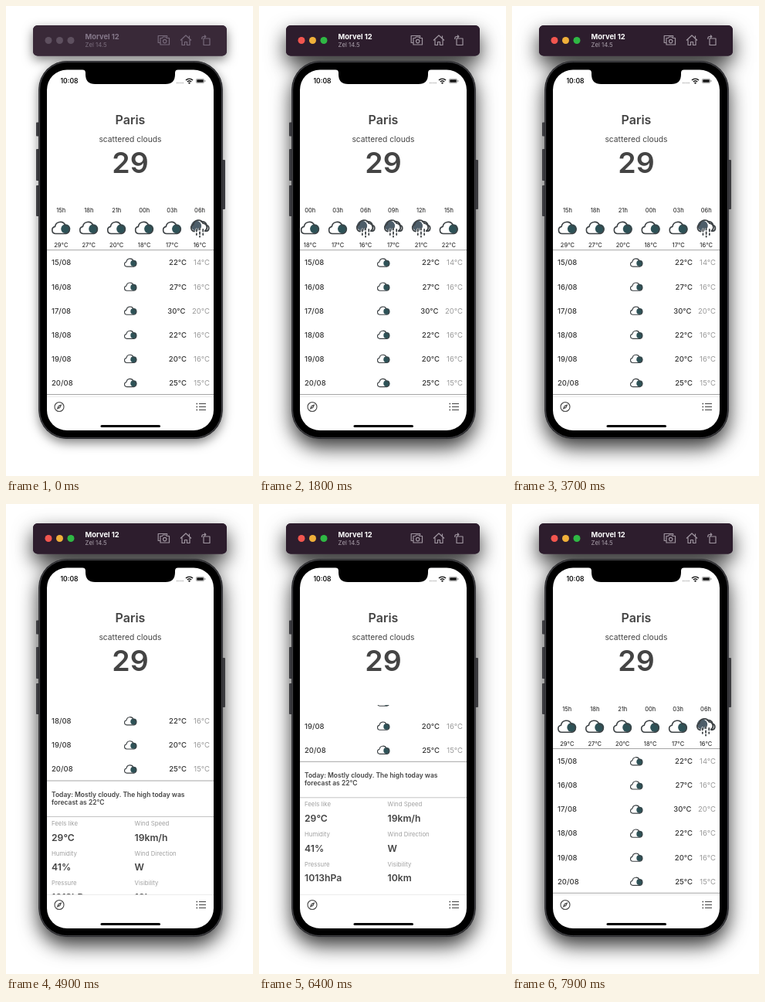
Write an HTML page that moves like this. It is 320 px wide and 608 px high and loops after 8 s.

```html
<!DOCTYPE html>
<html lang="en">
<head>
<meta charset="utf-8">
<title>Weather app</title>
<style>
  html, body { margin: 0; width: 100%; height: 100%; overflow: hidden; background: #fff; }
  svg { display: block; width: 320px; height: 608px; font-family: Inter, "Liberation Sans", sans-serif; }
</style>
</head>
<body>
<svg id="stage" viewBox="0 0 320 608" xmlns="http://www.w3.org/2000/svg">
  <defs>
    <filter id="idle" x="-20%" y="-20%" width="140%" height="140%">
      <feDropShadow dx="0" dy="5" stdDeviation="7" flood-opacity=".5"/>
    </filter>
    <filter id="focus" x="-20%" y="-20%" width="140%" height="140%">
      <feDropShadow dx="0" dy="11" stdDeviation="13" flood-opacity=".8"/>
    </filter>
    <clipPath id="view"><rect x="53" y="260" width="216" height="245.5"/></clipPath>
    <path id="puff" d="M-7 7.5a4.6 4.6 0 0 1-.8-9.1a7 7 0 0 1 13.4-1.6a5.4 5.4 0 0 1 1 10.7z"/>
    <g id="clouds">
      <use href="#puff" fill="#fff"/>
      <circle cx="6" cy="1.2" r="6" fill="#2e5257"/>
      <use href="#puff" fill="none" stroke="#3d4245" stroke-width="1.6"/>
    </g>
    <g id="rain" fill="none" stroke="#3d4245" stroke-width="1.8" stroke-linecap="round">
      <path d="M2-8a5.8 5.8 0 0 1 7 4.6a4 4 0 0 1 0 7.6h-2" fill="#fff"/>
      <circle cx="-4.5" cy="-2.6" r="6.6" fill="#4d5d69" stroke="none"/>
      <path d="M-7 4.5a4.6 4.6 0 0 1-1.4-8.8a6.6 6.6 0 0 1 12.6-1.600a5.300 5.300 0 0 1 2.800 9.600"/>
      <path d="M-4.200 2v7M0 1v10M4.200 2v7" stroke="#fff" stroke-width="3"/>
      <path d="M-4.200 2v2.500M-4.200 7.500v1.500M0 0v2.500M0 5.500v2.500M0 10.700v1M4.200 2v2.500M4.200 7.500v1.500"/>
    </g>
  </defs>

  <g id="shadow">
    <rect x="35" y="25" width="251" height="39.5" rx="6" fill="#2d1c2e"/>
    <rect x="42.5" y="71" width="238" height="489" rx="37" fill="#3b3b3e"/>
  </g>

  <rect id="bar" x="35" y="25" width="251" height="39.5" rx="6"/>
  <g id="lights">
    <circle cx="55" cy="44.5" r="4.5"/><circle cx="69.5" cy="44.5" r="4.5"/><circle cx="84" cy="44.5" r="4.5"/>
  </g>
  <text id="title" x="102.5" y="43.4" font-size="9.4" font-weight="700">Morvel 12</text>
  <text id="sub" x="102.5" y="53.2" font-size="7.8">Zel 14.5</text>
  <g id="tools" fill="none" stroke-width="1.2" stroke-linejoin="round">
    <path d="M199.5 47.5h-2.3v-9h11.5v2M200 41.5h2.500l1-1.5h3.5l1 1.5h3.5v8.500h-11.5z"/>
    <circle cx="205.7" cy="45.6" r="2.2"/>
    <path d="M226 44.5l7-6.5l7 6.5M228 43.5v7h3.5v-4h3v4h3.5v-7M237.5 41.5v-3"/>
    <path d="M256 42h8v8.500h-8zM253.800 43v-1a2.500 2.500 0 0 1 2.500-2.500h2M257 37.700l1.800 1.800l-1.800 1.800"/>
  </g>

  <g fill="#3c3c40">
    <rect x="39" y="150.5" width="5" height="18" rx="1"/>
    <rect x="39" y="185" width="5" height="41" rx="1"/>
    <rect x="39" y="232" width="5" height="40" rx="1"/>
    <rect x="279" y="199" width="5" height="64" rx="1"/>
  </g>
  <rect x="42.2" y="71" width="238.6" height="489" rx="37" fill="#29292c"/>
  <rect x="43.6" y="72.4" width="235.8" height="486.2" rx="35.6" stroke="#505054" stroke-width=".9"/>
  <rect x="53" y="82.5" width="216" height="466.5" rx="26" fill="#fff"/>
  <path d="M99 82h124q-4 .5-4 4.500v2q0 12.5-12.5 12.5h-91q-12.5 0-12.5-12.5v-2q0-4-4-4.500z"/>

  <text x="82" y="100.2" font-size="8.6" font-weight="600" text-anchor="middle" fill="#111">10:08</text>
  <path d="M221 99.5h9" stroke="#aaa" stroke-width="1.3" stroke-dasharray="1.3 1.2"/>
  <g fill="none" stroke="#111" stroke-width="1.4">
    <path d="M233 96a6.3 6.3 0 0 1 9 0M234.8 98a3.9 3.9 0 0 1 5.4 0"/>
    <circle cx="237.5" cy="99.6" r=".5"/>
    <rect x="246.3" y="94.3" width="10.4" height="5.4" rx="1.6" stroke="#888" stroke-width=".7"/>
  </g>
  <rect x="247.2" y="95.2" width="8.6" height="3.6" rx=".8" fill="#111"/>
  <path d="M257.8 96v2" stroke="#888"/>

  <g fill="#444" text-anchor="middle">
    <text x="161" y="153" font-size="16" font-weight="600">Paris</text>
    <text x="161" y="175.6" font-size="10.3">scattered clouds</text>
    <text x="161" y="216.2" font-size="37.5" font-weight="600">29</text>
  </g>

  <g clip-path="url(#view)"><g id="page"><g id="hours"></g></g></g>

  <path d="M53 505.5h216" stroke="#e4e4e4" stroke-width=".7"/>
  <g fill="none" stroke="#444" stroke-width="1.1">
    <circle cx="69" cy="518.5" r="6"/>
    <path d="M72 515.5l-1.8 4.2l-4.2 1.8l1.8-4.2z" fill="#444" stroke-width=".4"/>
    <circle cx="69" cy="518.5" r=".8" fill="#fff" stroke="none"/>
    <path d="M250 514.5h9M250 518.5h9M250 522.5h9"/>
    <path d="M246.5 514.5h1.6M246.5 518.5h1.6M246.5 522.5h1.6" stroke-width="1.5"/>
  </g>
  <rect x="122.5" y="542" width="77.5" height="3" rx="1.5"/>
</svg>
<script>
const $ = id => document.getElementById(id);
const NS = 'http://www.w3.org/2000/svg';

function add(parent, tag, attrs, text) {
  const el = document.createElementNS(NS, tag);
  for (const k in attrs) el.setAttribute(k, attrs[k]);
  if (text) el.textContent = text;
  parent.appendChild(el);
}
function label(parent, text, x, y, size, weight = 500, fill = '#333', anchor = 'start') {
  add(parent, 'text', { x, y, fill, 'font-size': size, 'font-weight': weight, 'text-anchor': anchor }, text);
}
function icon(parent, name, x, y, scale) {
  add(parent, 'use', { href: '#' + name, transform: `translate(${x} ${y}) scale(${scale})` });
}
function rule(y, stroke) {
  add($('page'), 'path', { d: `M53 ${y}h216`, stroke, 'stroke-width': 1 });
}

const hourTemps = [29, 27, 20, 18, 17, 16, 17, 21, 22];
const days = [[22, 14], [27, 16], [30, 20], [22, 16], [20, 16], [25, 15]];
const facts = [
  ['Feels like', '29°C', 'Wind Speed', '19km/h'],
  ['Humidity', '41%', 'Wind Direction', 'W'],
  ['Pressure', '1013hPa', 'Visibility', '10km']
];

function build() {
  const page = $('page'), hours = $('hours');
  hourTemps.forEach((temp, i) => {
    const x = 71.3 + i * 35.95;
    const hour = String((15 + i * 3) % 24).padStart(2, '0');
    label(hours, hour + 'h', x, 267.3, 7.4, 500, '#333', 'middle');
    icon(hours, i > 4 && i < 8 ? 'rain' : 'clouds', x, 287, 1);
    label(hours, temp + '°C', x, 312, 7.5, 500, '#333', 'middle');
  });
  rule(315.7, '#a6a6a6');
  days.forEach(([high, low], i) => {
    const y = 332 + i * 31.1;
    label(page, `${15 + i}/08`, 59, y + 3.4, 9.5);
    icon(page, 'clouds', 161.3, y, .68);
    label(page, high + '°C', low === 20 ? 232.5 : 234, y + 3.4, 9.5, 500, '#333', 'end');
    label(page, low + '°C', 264, y + 3.4, 9.5, 400, '#999', 'end');
  });
  rule(502.5, '#a6a6a6');
  label(page, 'Today: Mostly cloudy. The high today was', 59, 523.4, 8.5, 600, '#444');
  label(page, 'forecast as 22°C', 59, 533.6, 8.5, 600, '#444');
  rule(549, '#c4c4c4');
  facts.forEach((row, i) => {
    const y = 560.3 + i * 38.8;
    [59, 166.5].forEach((x, c) => {
      label(page, row[c * 2], x, y, 7.8, 400, '#a0a0a0');
      label(page, row[c * 2 + 1], x, y + 19.7, 12.2, 600, '#444');
    });
  });
}

// Scroll offsets as [ms, px], including the elastic overshoot at both ends
const sideKeys = [[900, 0], [1200, 22], [1500, 74], [1800, 113], [2000, 121], [2300, 111], [2600, 103],
  [2900, 28], [3100, -14], [3300, -8], [3700, -.6], [4100, 0]];
const downKeys = [[4200, 0], [4500, 34], [4700, 92], [4900, 144.5], [5100, 177], [5220, 180], [5600, 169.2],
  [6400, 169.2], [6600, 122], [6900, 22], [7080, -25], [7200, -23.4], [7450, -9], [7900, -.8]];

// Smooth curve through the keys that stays flat at every turning point
function curve(keys, t) {
  const n = keys.length - 1;
  if (t <= keys[0][0]) return keys[0][1];
  if (t >= keys[n][0]) return keys[n][1];
  const slope = i => (keys[i + 1][1] - keys[i][1]) / (keys[i + 1][0] - keys[i][0]);
  const tangent = i => {
    if (i === 0 || i === n) return 0;
    const a = slope(i - 1), b = slope(i);
    return a * b <= 0 ? 0 : 2 * a * b / (a + b);
  };
  const i = keys.findIndex(k => k[0] > t) - 1;
  const [t0, v0] = keys[i], [t1, v1] = keys[i + 1];
  const d = t1 - t0, u = (t - t0) / d, w = 1 - u;
  return v0 * (1 + 2 * u) * w * w + v1 * u * u * (3 - 2 * u)
    + d * u * w * (tangent(i) * w - tangent(i + 1) * u);
}

function render(t) {
  const on = t >= 900;
  const paint = (id, name, value) => $(id).setAttribute(name, value);
  paint('shadow', 'filter', on ? 'url(#focus)' : 'url(#idle)');
  paint('bar', 'fill', on ? '#2d1d2d' : '#392938');
  paint('title', 'fill', on ? '#fff' : '#85788a');
  paint('sub', 'fill', on ? '#aaa0ab' : '#7b6e7d');
  paint('tools', 'stroke', on ? '#9f95a0' : '#76697a');
  ['#f2564f', '#f0b03a', '#2fb844'].forEach((c, i) =>
    $('lights').children[i].setAttribute('fill', on ? c : '#5e505f'));
  paint('hours', 'transform', `translate(${-curve(sideKeys, t)} 0)`);
  paint('page', 'transform', `translate(0 ${-curve(downKeys, t)})`);
}

build();
const start = performance.now();
function tick() {
  const t = Math.max(0, performance.now() - start) % 8000;
  render(Math.floor(t / 100) * 100);
  requestAnimationFrame(tick);
}
tick();
</script>
</body>
</html>
```
